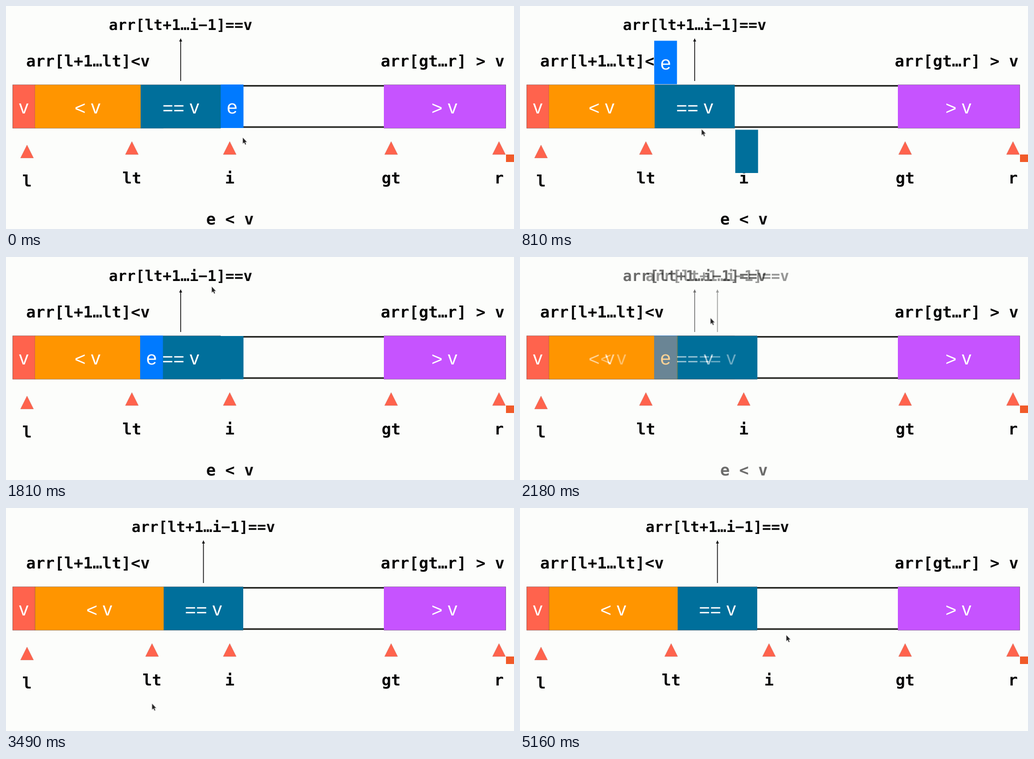
An HTML page for the animation above (8.28 s loop, 1015 by 446 pixels).

```html
<!DOCTYPE html>
<html lang="en">
<head>
<meta charset="utf-8">
<title>Three-way partition</title>
<style>
  html, body { margin: 0; width: 100%; height: 100%; overflow: hidden; background: #fcfdfb; }
  svg { display: block; width: 1015px; height: 446px; text-rendering: geometricPrecision; }
  text { font: bold 31.6px "DejaVu Sans Mono", monospace; fill: #060606; }
  .range { font-size: 29.76px; }
  .cell { font: 38px "Liberation Sans", Arial, sans-serif; fill: #fff; text-anchor: middle; }
  .name { text-anchor: middle; }
  .red { fill: #ff634d; }
  .orange { fill: #ff9500; }
  .teal { fill: #006f9b; }
  .blue { fill: #007aff; }
  .purple { fill: #c653ff; }
  .edge { fill: none; stroke: #555; stroke-opacity: .5; }

  .mover, .pointer, .cursor, .out, .in, .under { animation: 8280ms linear infinite; }

  /* swap of e with the first equal element */
  .mover { offset-rotate: 0deg; animation-name: swap; }
  .mover.e { offset-path: path("M429 157C512 -2 185 -2 268 157"); }
  .mover.eq { offset-path: path("M269 158C184 322 514 322 429 158"); }
  @keyframes swap {
    0% { offset-distance: 0%; }
    1.33% { offset-distance: 0%; animation-timing-function: cubic-bezier(.37, 0, .63, 1); }
    14.13%, 100% { offset-distance: 100%; }
  }

  /* regions regroup */
  .out { animation-name: out; }
  .in { animation-name: in; }
  .under { animation-name: under; }
  @keyframes out { 0%, 24.88% { opacity: 1; } 28.4%, 100% { opacity: 0; } }
  @keyframes in { 0%, 24.88% { opacity: 0; } 28.4%, 100% { opacity: 1; } }
  @keyframes under { 0%, 24.87% { opacity: 0; } 24.88%, 100% { opacity: 1; } }

  /* lt and i advance */
  .pointer.lt { animation-name: step-lt; }
  .pointer.i { animation-name: step-i; }
  @keyframes step-lt {
    0% { transform: translate(0, 0); }
    34.54% { transform: translate(0, 0); animation-timing-function: cubic-bezier(.37, 0, .63, 1); }
    45.41%, 100% { transform: translate(50.5px, 0); }
  }
  @keyframes step-i {
    0% { transform: translate(0, 0); }
    45.41% { transform: translate(0, 0); animation-timing-function: cubic-bezier(.37, 0, .63, 1); }
    56.28%, 100% { transform: translate(50.5px, 0); }
  }

  .cursor { animation-name: cursor; }
  @keyframes cursor {
    0%, 1.33% { transform: translate(473px, 263px); }
    5.92% { transform: translate(457px, 268px); }
    11.96% { transform: translate(310px, 234px); }
    18%, 21.85% { transform: translate(414px, 232px); }
    21.855%, 24.88% { transform: translate(411px, 59px); }
    32.6%, 39.86% { transform: translate(250px, 391px); }
    50.36% { transform: translate(440px, 391px); }
    52.66% { transform: translate(456px, 379px); }
    61.1%, 62.3% { transform: translate(485px, 319px); }
    62.31%, 100% { transform: translate(532px, 254px); }
  }
</style>
</head>
<body>
<svg viewBox="0 0 1015 446">
  <defs>
    <path id="tri" class="red" d="M0 0L13 26H-13Z" stroke="#a85a4a" stroke-opacity=".5" stroke-width=".7"/>
    <g id="arrow">
      <path d="M0 68V150" stroke="#111" stroke-width="1.6"/>
      <path d="M0 64.5L3 71H-3Z" fill="#111"/>
    </g>
  </defs>

  <path d="M429 159.6H755M429 242.2H755" stroke="#282925" stroke-width="3.2"/>

  <text x="40.2" y="120.5">arr[l+1…lt]&lt;v</text>
  <text x="748.8" y="120.5">arr[gt…r] &gt; v</text>

  <g class="under">
    <rect class="orange" x="58" y="157.5" width="257" height="87"/>
    <rect class="teal" x="315" y="157.5" width="159" height="87"/>
    <path class="edge" d="M58 157.5H474M58 244.5H474"/>
    <text class="cell" x="186.5" y="217">&lt;<tspan dy="-2"> v</tspan></text>
    <text class="cell" x="394.5" y="217">==<tspan dy="-2"> v</tspan></text>
  </g>
  <g class="in">
    <text class="range" x="251" y="47.5">arr[lt+1…i−1]==v</text>
    <use href="#arrow" x="394.5"/>
  </g>

  <rect class="red" x="13" y="157.5" width="45" height="87"/>
  <rect class="purple" x="755" y="157.5" width="244" height="87"/>
  <path class="edge" d="M58 157.5H13.5V244.5H58ZM755 157.5H998.5V244.5H755"/>
  <text class="cell" x="35.5" y="215">v</text>
  <text class="cell" x="876" y="217">&gt;<tspan dy="-2"> v</tspan></text>

  <use href="#tri" x="42" y="278"/>
  <text class="name" x="42" y="361">l</text>
  <g class="pointer lt">
    <use href="#tri" x="251.5" y="271"/>
    <text class="name" x="251.5" y="355">lt</text>
  </g>
  <g class="pointer i">
    <use href="#tri" x="447" y="271"/>
    <text class="name" x="447" y="355">i</text>
  </g>
  <use href="#tri" x="769.5" y="271"/>
  <text class="name" x="769.5" y="355">gt</text>
  <use href="#tri" x="985" y="271"/>
  <text class="name" x="985" y="355">r</text>

  <g class="out">
    <text class="range" x="205.5" y="47.5">arr[lt+1…i−1]==v</text>
    <use href="#arrow" x="349"/>
    <rect class="orange" x="58" y="157.5" width="211" height="87"/>
    <rect class="teal" x="269" y="157.5" width="160" height="87"/>
    <path class="edge" d="M58 157.5H429M58 244.5H429"/>
    <text class="cell" x="163" y="217">&lt;<tspan dy="-2"> v</tspan></text>
    <text class="cell" x="349" y="217">==<tspan dy="-2"> v</tspan></text>
    <text x="400" y="437">e &lt; v</text>
    <g class="mover eq"><rect class="teal" width="45.5" height="86.5"/></g>
    <g class="mover e">
      <rect class="blue" width="45.5" height="87"/>
      <text class="cell" x="22.8" y="58">e</text>
    </g>
  </g>

  <rect x="999" y="297" width="16" height="15" fill="#f15a29"/>

  <g class="cursor">
    <path d="M0 0V12.5L2.8 10L4.9 14.5L6.9 13.5L4.9 9.2H8.6Z" fill="#222" stroke="#ddd" stroke-width=".6"/>
  </g>
</svg>
</body>
</html>
```
